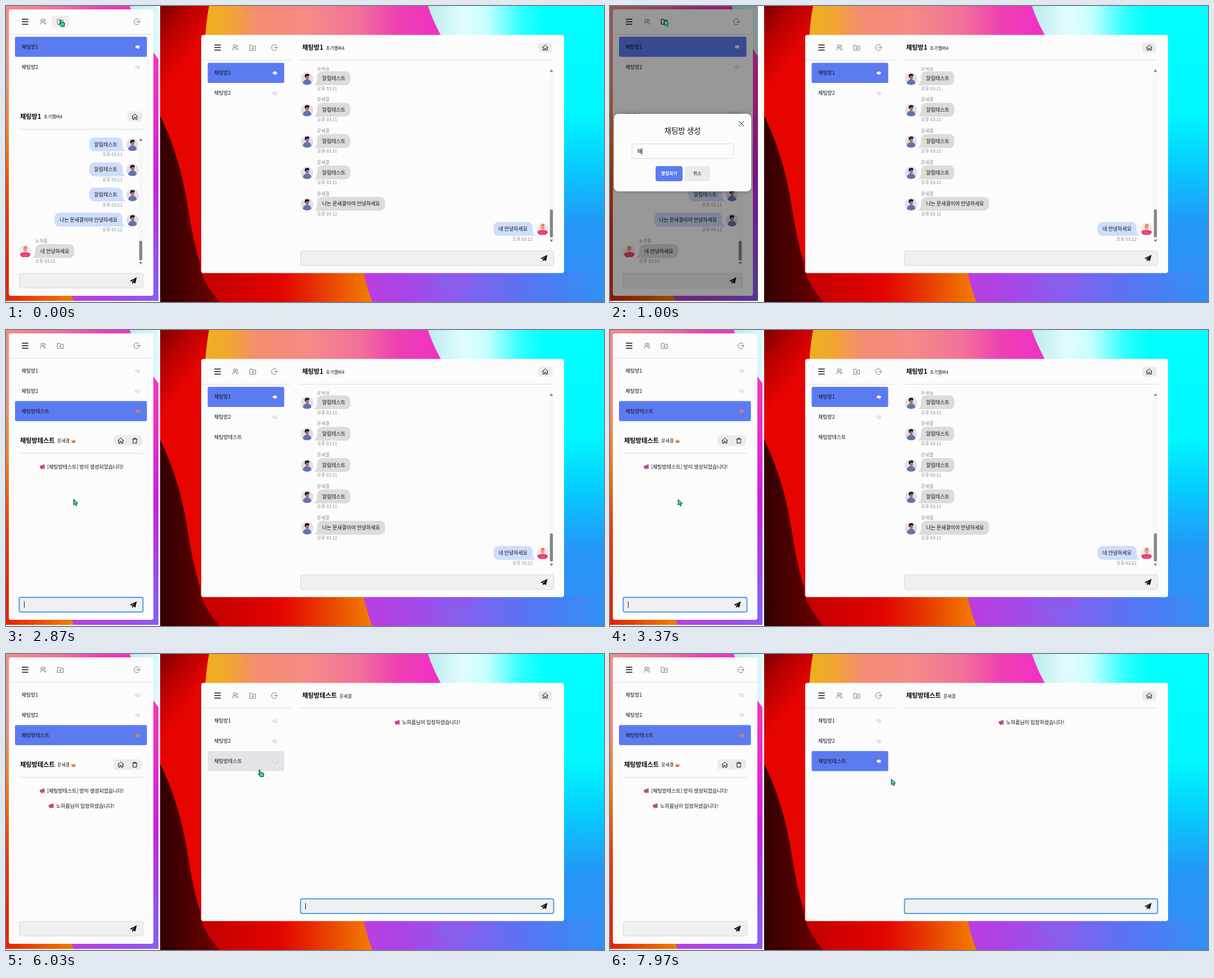
Animation of 1063x527 px, one loop 8000 ms. Source, as an HTML page with a canvas:

```html
<!DOCTYPE html>
<html lang="ko">
<head>
<meta charset="utf-8">
<style>
html, body { margin: 0; width: 100%; height: 100%; overflow: hidden; background: #fff }
canvas { display: block }
</style>
</head>
<body>
<canvas id="stage" width="1063" height="527"></canvas>
<script>
const g = document.getElementById('stage').getContext('2d');
const LOOP = 8000, PAPER = '#fcfcfc', BLUE = '#5b7bf0', INK = '#111', GREY = '#888';
const FONT = '"Noto Sans CJK KR","Noto Sans CJK JP","Noto Sans CJK",sans-serif';
const HOST = '문새결', GUEST = '노하름', FIRST = '초기멤버4', NEW_ROOM = '채팅방테스트';
const TYPED = ['ㅊ', '채', '챝', '채티', '채팅', '채팅ㅂ', '채팅바', '채팅방', '채팅방ㅌ',
  '채팅방테', '채팅방텟', '채팅방테스', '채팅방테슽', NEW_ROOM];

// Moments of the story, in ms
const OPEN = 560, TYPE = 900, CLOSE = 2520, CREATE = 2860, BLUR = 4800, ENTER = 5900;
const MOUSE = [[0, 97, 25], [1800, 97, 25], [2200, 119, 301], [3450, 121, 302],
  [4750, 408, 193], [5250, 408, 193], [6030, 451, 207], [6650, 500, 223]];

const clamp = v => Math.max(0, Math.min(1, v));

function mouseAt(t) {
  const i = MOUSE.findIndex(k => k[0] > t);
  if (i < 0) return MOUSE[MOUSE.length - 1].slice(1);
  const [a, ax, ay] = MOUSE[i - 1], [b, bx, by] = MOUSE[i];
  let p = (t - a) / (b - a);
  p = p * p * (3 - 2 * p);
  return [ax + (bx - ax) * p, ay + (by - ay) * p];
}

function text(s, x, y, size = 8.96, color = INK, weight = 400, align = 'left') {
  g.font = `${weight} ${size}px ${FONT}`;
  g.textAlign = align;
  g.fillStyle = color;
  g.fillText(s, x, y + size * .37);
  return g.measureText(s).width;
}

function box(x, y, w, h, r, fill, stroke, line = 1) {
  g.beginPath();
  g.roundRect(x, y, w, h, r);
  if (fill) { g.fillStyle = fill; g.fill(); }
  if (stroke) { g.strokeStyle = stroke; g.lineWidth = line; g.stroke(); }
}

function oval(x, y, rx, ry, fill) {
  g.beginPath();
  g.ellipse(x, y, rx, ry, 0, 0, 7);
  g.fillStyle = fill;
  g.fill();
}

function path(d, x, y, fill, stroke, line = 1) {
  const p = new Path2D(d);
  g.save();
  g.translate(x, y);
  g.lineJoin = g.lineCap = 'round';
  if (fill) { g.fillStyle = fill; g.fill(p); }
  if (stroke) { g.strokeStyle = stroke; g.lineWidth = line; g.stroke(p); }
  g.restore();
}

function rule(x1, x2, y) {
  g.fillStyle = '#dcdcdc';
  g.fillRect(x1, y, x2 - x1, 1);
}

// Gradient between two points with [offset, colour] stops
function blend(x1, y1, x2, y2, ...stops) {
  const f = g.createLinearGradient(x1, y1, x2, y2);
  stops.forEach(([o, c]) => f.addColorStop(o, c));
  return f;
}

function wallpaper(x, w, h, dx) {
  g.save();
  g.beginPath();
  g.rect(x, 0, w, h);
  g.clip();
  g.translate(dx, 0);
  g.fillStyle = blend(274, 0, 350, 60, [0, '#780000'], [.45, '#b80000'], [1, '#e60400']);
  g.fillRect(274, 0, 790, 527);
  path('M274 195C300 250 315 300 325 370Q345 490 380 527H274Z', 0, 0,
    blend(274, 0, 370, 0, [0, '#300000'], [1, '#6a0000']));
  path('M361 0Q356 25 354 60H820V0Z', 0, 0,
    blend(355, 0, 770, 0, [0, '#efb01c'], [.1, '#f2a632'], [.22, '#f48d70'], [.45, '#f58a88'],
      [.66, '#f2709a'], [.82, '#ee40b2'], [1, '#f030c4']));
  g.fillStyle = blend(0, 0, 0, 445, [0, '#f58a88'], [.3, '#f58c70'], [.55, '#f27818'], [.8, '#ea3c00'], [1, '#e62800']);
  g.fillRect(510, 55, 130, 390);
  g.fillStyle = blend(380, 0, 645, 0, [0, '#c80000'], [.4, '#e20400'], [.6, '#e62800'], [.8, '#ea5200'], [1, '#f27a00']);
  path('M345 445H660V527H379Q356 500 345 470Z', 0, 0, g.fillStyle);
  path('M630 445Q637 490 651 527H1063V445Z', 0, 0,
    blend(640, 0, 1063, 0, [0, '#ba3ee0'], [.2, '#a648e8'], [.4, '#8660f0'], [.65, '#5c72f2'], [1, '#2f90f6']));
  g.fillStyle = blend(0, 60, 0, 500, [0, '#f23cb8'], [.3, '#ea2cc4'], [.55, '#cc1ee0'], [1, '#8660ec']);
  g.fillRect(770, 55, 60, 445);
  path('M750 0Q766 48 801 95L900 220H1063V0Z', 0, 0,
    blend(750, 0, 960, 0, [0, '#bcecf0'], [.3, '#e2fcfc'], [.5, '#c4ffff'], [.8, '#2cffff'], [1, '#00ffff']));
  g.fillStyle = blend(0, 0, 0, 475, [0, '#00ffff'], [.4, '#00f8ff'], [.6, '#06ccff'], [.82, '#2496f6'], [1, '#3090f6']);
  g.fillRect(985, 0, 80, 475);
  g.restore();
}

function house(x, y) {
  path('M-5 0L0-4.8 5 0M-3.8-1V4.6H-1.2V1.3H1.2V4.6H3.8V-1', x, y, null, INK);
}

function trash(x, y) {
  path('M-4-2.8H4M-1.4-2.8V-4.3H1.4V-2.8M-3.2-2.8V4.4H3.2V-2.8', x, y, null, INK);
}

function plane(x, y) {
  path('M6-6L3.4 5.2 0 3.2-2.2 5.8-2.4 2 3.5-3.6-3.6 1.4-6.4 .2Z', x, y, '#0a0a0a');
}

function toolbar(x, y, exit, folderInk = '#666') {
  path('M-5.2-4.5H5.2M-5.2 0H5.2M-5.2 4.5H5.2', x, y, null, INK, 1.3);
  path('M-4.8 4.8Q-4.6 .8-1 .2Q2.5 .8 2.8 4.8M-3.4-2.3A2.5 2.5 0 1 1 1.6-2.3A2.5 2.5 0 1 1-3.4-2.3M2-4.6Q4.8-4.2 4.2-1.4L2.8 .4Q5 1.2 5.2 4',
    x + 31.5, y, null, '#666', .9);
  path('M-5.3 4.4V-4.2H-1.5L0-2.6H5.3V4.4ZM-1.6 1H2M.2-.8V2.8', x + 62.5, y, null, folderInk, folderInk === INK ? 1.2 : .9);
  path('M4-3.6A5.2 5.2 0 1 0 4 3.6M-.5 0H5.6M3.8-1.8L5.6 0 3.8 1.8', exit, y, null, '#666', .9);
}

function speech(x, y, lit) {
  path('M-3.8-.4C-3.8-3.4 3.8-3.4 3.8-.4C3.8 1.8 1 2 .6 2L2.6 3.2-1 2.1C-3 2-3.8 1-3.8-.4Z', x, y,
    lit ? '#faf0f8' : '#f0ebfa', lit ? '#e4d2ee' : '#b9aed0', .6);
}

function crown(x, y) {
  path('M-4-2.4L-1.6-.6 0-3.4 1.6-.6 4-2.4 3 3H-3Z', x, y, '#f08a3c');
  oval(x, y + 1, 1.2, 1.2, '#e0406c');
}

function horn(x, y) {
  path('M-4.5-1.2L2.2-4V3.6L-4.5 1.6Z', x, y, '#d83a84');
  path('M-3 1.6L-1.8 4.4H0L-.8 2Z', x, y, '#7a3a86');
  path('M2.2-4H4V3.8H2.2Z', x, y, '#8c3c90');
}

function room(x, w, c, name, state, mark) {
  const fill = { on: BLUE, hover: '#e2e4e8' }[state];
  if (fill) box(x, c - 17.8, w, 35.8, 2.5, fill);
  text(name, x + 11.5, c);
  if (mark) mark(x + w - 16.5, c + .5, state === 'on');
}

function avatar(x, y, host) {
  g.save();
  g.beginPath();
  g.arc(x, y, 11, 0, 7);
  g.clip();
  g.fillStyle = host ? '#e2dced' : '#f1e8ee';
  g.fillRect(x - 11, y - 11, 22, 22);
  if (host) {
    path('M-8.5 12Q-8 3-2 1.4L2.5 1.4Q8 3 8.5 12Z', x, y, '#6074ae');
    oval(x + .3, y - 2.5, 2.8, 4.2, '#b0705c');
    path('M-4-3Q-5-9 0-8.8Q5-9.2 3.8-4.4L1-5.6-2-4.4-2.4-2Z', x, y, '#1c1520');
  } else {
    oval(x, y - 4, 3.4, 5, '#f0a080');
    path('M-3.4-4Q-3-10 1.4-9.8Q4.6-8 3-4Q0-8-3.4-4Z', x, y, '#e8863c');
    path('M-9.5 5Q-7 1 0 1.6Q7 1 9.5 5L6.5 10H-6.5Z', x, y, '#e63468');
    path('M-5 4.6Q0 6.6 5 4.6M-5 7.2Q0 9 5 7.2', x, y, null, '#f58aa8', .7);
  }
  g.restore();
}

// x is the bubble edge next to the avatar
function message(x, c, s, time, mine, host) {
  g.font = `400 8.96px ${FONT}`;
  const w = g.measureText(s).width + 18, left = mine ? x - w : x;
  const fill = mine ? '#cfddfc' : '#dcdcda', d = mine ? 1 : -1;
  path(`M0 2Q${d} 10 ${6 * d} 12.3H${-9 * d}V2Z`, x, c, fill);
  box(left, c - 12.4, w, 24.8, 9, fill);
  text(s, left + 9, c);
  avatar(x + 17.8 * d, c + .8, host);
  text(time, x, c + 18, 7.84, GREY, 400, mine ? 'right' : 'left');
  if (!mine) text(host ? HOST : GUEST, x, c - 18, 7.84, GREY);
}

function scrollbar(x, top, thumb, end, bottom) {
  g.fillStyle = '#f7f7f7';
  g.fillRect(x - 4, top - 5, 8, bottom - top + 10);
  path('M-3 2L0-2 3 2Z', x, top, '#777');
  path('M-3-2L0 2 3-2Z', x, bottom, '#777');
  box(x - 2.7, thumb, 5.4, end - thumb, 2.5, '#868686');
}

function field(x, y, w, focus, t, since) {
  box(x + .5, y + .5, w - 1, 26, 3, '#f0f0f0', focus ? '#4c9cee' : '#d8d8da', focus ? 2 : 1);
  plane(x + w - 17.5, y + 13.5);
  if (focus && Math.floor((t - since) / 530) % 2 === 0) {
    g.fillStyle = INK;
    g.fillRect(x + 9, y + 8, 1, 11);
  }
}

function header(x, y, title, user) {
  const w = text(title, x, y, 11.2, '#000', 700);
  text(user, x + w + 4.5, y + 1, 7.84, INK, 500);
}

const hello = `나는 ${HOST}이야 안녕하세요`, reply = '네 안녕하세요', alarm = '알림테스트';
const joined = `${GUEST}님이 입장하셨습니다!`;

function notice(s, x, y) {
  horn(x - 8.5, y);
  text(s, x, y);
}

function leftPage(t, modal) {
  const dx = modal ? -8 : 0, made = t >= CREATE;
  wallpaper(0, 271 + dx, 525, modal ? -534 : -530);
  box(5, 6, 257 + dx, 510, 4, PAPER);
  if (t < 700) box(81, 17, 31, 22, 5, '#eeeeee');
  toolbar(34, 28, 232.5 + dx, t >= OPEN && modal ? INK : '#666');
  rule(5, 262 + dx, 50);
  const w = 234.5 + dx;
  room(16, w, 72.5, '채팅방1', made ? '' : 'on', speech);
  room(16, w, 108.2, '채팅방2', '', speech);
  if (made) room(16, w, 144.2, NEW_ROOM, 'on', crown);
  header(25, 196.5, made ? NEW_ROOM : '채팅방1', made ? HOST : FIRST);
  if (made) {
    crown(120, 198);
    box(191, 187.5, 51, 18.5, 6, '#ebebeb');
    house(204, 197);
    trash(229, 197);
  } else {
    box(216 + dx, 187.5, 26, 18.5, 6, '#ebebeb');
    house(229 + dx, 197);
  }
  rule(23, 244 + dx, 219);
  if (made) {
    notice(`[${NEW_ROOM}] 방이 생성되었습니다!`, 73, 243.5);
    if (t >= ENTER) notice(joined, 89, 270.3);
  } else {
    for (let i = 0; i < 4; i++)
      message(207 + dx, 246.3 + 44.7 * i, i < 3 ? alarm : hello, i < 3 ? '오후 03:11' : '오후 03:12', true, true);
    message(52, 436.3, reply, '오후 03:12', false, false);
    scrollbar(239.5 + dx, 238, 418, 453, 458);
  }
  field(23, 475.5, 221 + dx, made && t < BLUR, t, CREATE);
}

function rightPage(t, hover) {
  const inside = t >= ENTER;
  wallpaper(274, 789, 527, 0);
  box(347, 51.5, 645, 424, 4, PAPER);
  toolbar(376, 74, 477);
  rule(347, 506, 96);
  room(358.5, 136, 119, '채팅방1', inside ? '' : 'on', speech);
  room(358.5, 136, 154.8, '채팅방2', '', speech);
  if (t >= CREATE)
    room(358.5, 136, 190.5, NEW_ROOM, hover ? 'hover' : inside ? 'on' : '', inside && speech);
  header(526.5, 74, inside ? NEW_ROOM : '채팅방1', inside ? HOST : FIRST);
  box(946, 65, 25.5, 18, 6, '#ebebeb');
  house(958.5, 74);
  rule(523, 973, 96);
  if (inside) notice(joined, 704, 121.8);
  else {
    g.save();
    g.beginPath();
    g.rect(510, 109, 480, 320);
    g.clip();
    for (let i = 0; i < 5; i++)
      message(553, 128.7 + 55.85 * i, i < 4 ? alarm : hello, i < 4 ? '오후 03:11' : '오후 03:12', false, true);
    message(936, 396.8, reply, '오후 03:12', true, false);
    scrollbar(969.5, 115, 362, 412, 418);
    g.restore();
  }
  field(523, 435.5, 451, inside, t, ENTER);
}

function dialog(t, alpha, hot) {
  g.fillStyle = `rgba(0,0,0,${.4 * alpha})`;
  g.fillRect(0, 0, 263, 525);
  g.globalAlpha = alpha;
  g.shadowColor = 'rgba(0,0,0,.25)';
  g.shadowBlur = 8;
  box(7, 192, 244, 138, 8, PAPER);
  g.shadowBlur = 0;
  g.shadowColor = 'transparent';
  path('M-4.3-4.3L4.3 4.3M-4.3 4.3L4.3-4.3', 233.5, 209.5, null, INK);
  text('채팅방 생성', 129, 222.3, 13.44, INK, 500, 'center');
  box(39, 245.5, 180.5, 26, 4, PAPER, '#dedbc8');
  const step = Math.floor((t - TYPE) / 65);
  const typed = step < 0 ? '' : TYPED[Math.min(step, TYPED.length - 1)];
  const w = typed ? text(typed, 48, 259) : 0;
  if (!typed) text('채팅방 제목', 48, 259, 8.96, '#b0b0b0');
  if (step >= TYPED.length) {
    let d = 'M0 0';
    for (let x = 1; x < w; x++) d += `L${x} ${x % 2 * 1.4}`;
    path(d, 48, 263.8, null, '#e03040', .8);
  } else if (Math.floor((t - 600) / 530) % 2 === 0 || typed) {
    g.fillStyle = INK;
    g.fillRect(48 + w, 253.5, 1, 11);
  }
  box(81, 285, 48, 27, 4, hot ? '#4f69d6' : BLUE);
  text('생성하기', 105, 298.5, 7.84, '#fff', 700, 'center');
  box(133, 285, 45, 27, 4, '#ebebeb');
  text('취소', 155.3, 298.5, 7.84, INK, 500, 'center');
  g.globalAlpha = 1;
}

function cursor(x, y, hand) {
  if (hand) path('M-1.4 1Q-1.2-.6 .2-.4L1.6 4 6 4.4Q7.8 5 7 8.4L6.4 11.5H1.2L-2.6 7Q-2.6 5.4-.2 6.4Z',
    x, y, '#20dca2', '#123', 1);
  else path('M0 0L.2 10 2.6 8 4.2 11.4 6 10.6 4.6 7.2 7.4 6.8Z', x, y, '#20e0a4', '#123', .9);
}

function draw(t) {
  const [mx, my] = mouseAt(t);
  const alpha = clamp((t - OPEN) / 140) * (1 - clamp((t - CLOSE) / 150));
  const modal = t >= OPEN && t < CLOSE + 150;
  const onRoom = t > CREATE && mx > 358 && mx < 494 && my > 173 && my < 208;
  const onButton = modal && mx > 81 && mx < 129 && my > 285 && my < 312;
  g.fillStyle = '#fff';
  g.fillRect(0, 0, 1063, 527);
  leftPage(t, modal);
  if (modal) dialog(t, alpha, onButton);
  rightPage(t, onRoom);
  cursor(mx, my, t < OPEN || onRoom || onButton);
}

const start = performance.now();
function tick() {
  draw((performance.now() - start) % LOOP);
  requestAnimationFrame(tick);
}
tick();
</script>
</body>
</html>
```
